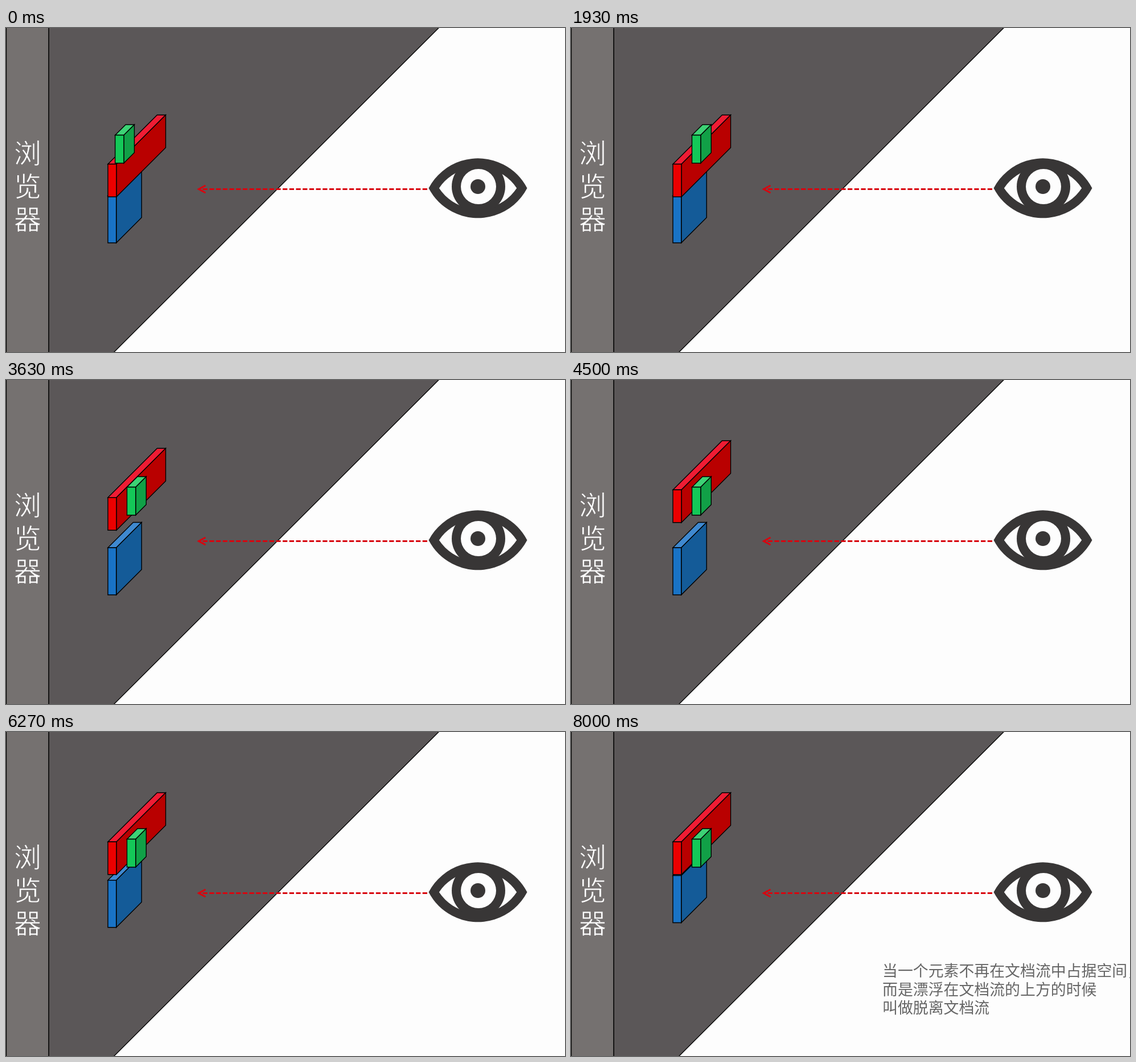
An HTML page with a canvas that plays this animation: 982x570 px, repeating every 8030 ms.

```html
<!DOCTYPE html>
<html lang="zh-CN">
<head>
<meta charset="utf-8">
<style>
html, body { margin: 0; width: 100%; height: 100%; overflow: hidden; background: #fdfdfd; }
canvas { display: block; }
</style>
</head>
<body>
<canvas id="stage" width="982" height="570"></canvas>
<script>
const ctx = document.getElementById('stage').getContext('2d');
const LOOP = 8030;
const MOVE = 2100;
const FONT = '"Noto Sans CJK SC", "Noto Sans CJK", "Noto Sans SC", sans-serif';
const PAPER = '#fdfdfd';
const BAR = '#757170';
const DARK = '#383636';
const ARROW = '#d8050f';

const NOTE = [
  '当一个元素不再在文档流中占据空间\uff0c',
  '而是漂浮在文档流的上方的时候',
  '叫做脱离文档流'
];

const RED = { front: '#ec0000', side: '#b90000', top: '#ef1c34' };
const GREEN = { front: '#14c858', side: '#11a047', top: '#3dd275' };
const BLUE = { front: '#1973c6', side: '#145b98', top: '#3f89d0' };

const clamp = v => Math.min(1, Math.max(0, v));

// constant acceleration, then constant braking
function glide(t, start) {
  const u = clamp((t - start) / MOVE);
  return u < 0.5 ? 2 * u * u : 1 - 2 * (1 - u) * (1 - u);
}

function poly(points, fill) {
  ctx.beginPath();
  points.forEach(([x, y]) => ctx.lineTo(x, y));
  ctx.closePath();
  ctx.fillStyle = fill;
  ctx.fill();
  ctx.strokeStyle = '#000';
  ctx.lineWidth = 1.4;
  ctx.stroke();
}

function box(x, y, w, h, d, color) {
  const r = x + w, b = y + h;
  poly([[x, y], [x + d, y - d], [r + d, y - d], [r, y]], color.top);
  poly([[r, y], [r + d, y - d], [r + d, b - d], [r, b]], color.side);
  poly([[x, y], [r, y], [r, b], [x, b]], color.front);
}

function disc(x, y, r, fill) {
  ctx.beginPath();
  ctx.arc(x, y, r, 0, Math.PI * 2);
  ctx.fillStyle = fill;
  ctx.fill();
}

// almond shape between two arcs of the given radius
function lens(x, y, offset, radius, fill) {
  const a = Math.asin(offset / radius);
  ctx.beginPath();
  ctx.arc(x, y + offset, radius, Math.PI + a, -a);
  ctx.arc(x, y - offset, radius, a, Math.PI - a);
  ctx.closePath();
  ctx.fillStyle = fill;
  ctx.fill();
}

function eye() {
  lens(829, 281.8, 45, 97.5, DARK);
  lens(829, 281.8, 45, 81.7, PAPER);
  disc(830, 279, 47, DARK);
  disc(830, 279, 31, PAPER);
  disc(829, 279, 13, DARK);
}

function arrow() {
  ctx.strokeStyle = ARROW;
  ctx.lineWidth = 3;
  ctx.setLineDash([8.3, 3.4]);
  ctx.beginPath();
  ctx.moveTo(740, 283.5);
  ctx.lineTo(340, 283.5);
  ctx.stroke();
  ctx.setLineDash([]);
  ctx.beginPath();
  ctx.moveTo(350.5, 277);
  ctx.lineTo(338.5, 283.5);
  ctx.lineTo(350.5, 290);
  ctx.stroke();
}

// trimming the outline with the ground colour gives a light weight
function thinText(text, x, y, fill, ground, trim) {
  ctx.fillStyle = fill;
  ctx.fillText(text, x, y);
  ctx.strokeStyle = ground;
  ctx.lineWidth = trim;
  ctx.lineJoin = 'round';
  ctx.strokeText(text, x, y);
  ctx.lineJoin = 'miter';
}

function backdrop() {
  ctx.fillStyle = PAPER;
  ctx.fillRect(0, 0, 982, 570);
  poly([[75, -20], [780, -20], [170, 590], [75, 590]], '#5b5758');
  poly([[0.5, -20], [75, -20], [75, 590], [0.5, 590]], BAR);
  ctx.font = `300 48px ${FONT}`;
  ctx.textAlign = 'center';
  [...'浏览器'].forEach((c, i) => thinText(c, 38, 237.8 + i * 58, '#fff', BAR, 0.9));
}

function note(t) {
  const alpha = clamp((t - 7600) / 400);
  if (!alpha) return;
  ctx.globalAlpha = alpha;
  ctx.fillStyle = '#666';
  ctx.font = `300 26.9px ${FONT}`;
  ctx.textAlign = 'left';
  NOTE.forEach((line, i) => ctx.fillText(line, 547, 430.3 + i * 32.3));
  ctx.globalAlpha = 1;
}

function draw(t) {
  backdrop();
  box(179, 295 - 42.5 * glide(t, 4826), 14.7, 83, 44.5, BLUE);
  box(179, 239.5 - 46.3 * glide(t, 2335), 15, 57.5, 86.5, RED);
  box(179 + 33.5 * glide(t, -913), 188.5, 15.3, 49.3, 18.5, GREEN);
  arrow();
  eye();
  note(t);
}

const begin = performance.now();
function tick() {
  draw((performance.now() - begin) % LOOP);
  requestAnimationFrame(tick);
}
tick();
</script>
</body>
</html>
```
